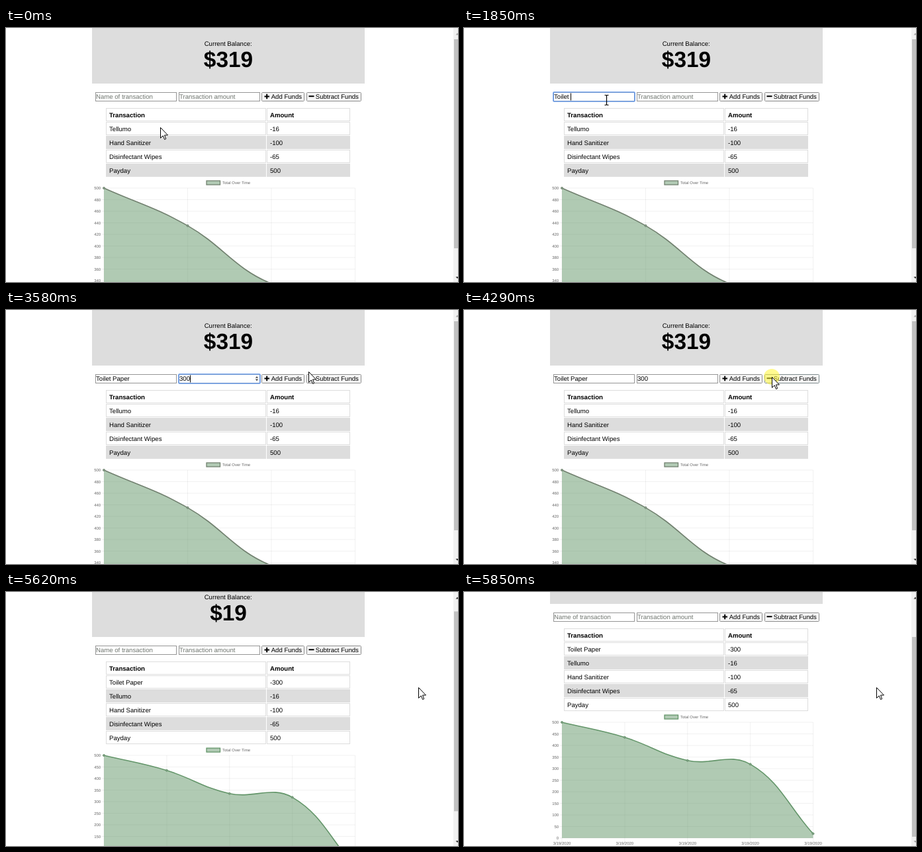
An HTML page that plays this animation: 683x384 px, repeating every 6540 ms.

```html
<!DOCTYPE html>
<html lang="en">
<head>
<meta charset="utf-8">
<title>Budget tracker</title>
<style>
  html, body { margin: 0; width: 100%; height: 100%; overflow: hidden; background: #fff; }
  svg { display: block; width: 683px; height: 384px; }
  text { font: 9.6px "Liberation Sans", Arial, sans-serif; fill: #000; white-space: pre; text-rendering: geometricPrecision; }
  .bold { font-weight: bold; }
  .total { font-size: 33.4px; font-weight: bold; text-anchor: middle; }
  .mid { text-anchor: middle; }
  .hint { fill: #6f756f; }
  .tick { font-size: 6px; fill: #666; }
  .end { text-anchor: end; }
</style>
</head>
<body>
<svg viewBox="0 0 683 384">
  <g id="page"></g>
  <g id="bar"></g>
  <g id="pointer"></g>
</svg>
<script>
const LOOP = 6540;
const el = id => document.getElementById(id);

const rows = [['Tellumo', -16], ['Hand Sanitizer', -100], ['Disinfectant Wipes', -65], ['Payday', 500]];
const nameKeys = [920, 1150, 1300, 1450, 1620, 1700, 1850, 2170, 2320, 2410, 2560, 2650];
const sumKeys = [2870, 3020, 3170];

// Pointer steps: time, x, y, shape
const moves = [
  [0, 233, 150, 'arrow'], [80, 229, 142, 'arrow'], [160, 222, 125, 'arrow'], [230, 217, 112, 'beam'],
  [310, 215, 109, 'beam'], [3430, 290, 105, 'beam'], [3500, 395, 98, 'arrow'], [3580, 457, 93, 'arrow'],
  [3740, 460, 96, 'arrow'], [3820, 463, 99, 'arrow'], [3890, 465, 100, 'arrow'], [4060, 465, 101, 'arrow'],
  [4840, 623, 144, 'arrow']
];
const scrolls = [[0, 0], [5620, 16], [5680, 33], [5770, 52], [5850, 66]];

const latest = (steps, t) => steps.filter(s => s[0] <= t).pop();
const typed = (word, keys, t) => word.slice(0, keys.filter(k => k <= t).length);
const within = (t, a, b) => t >= a && t < b;

const text = (s, x, y, cls = '') => `<text x="${x}" y="${y}" class="${cls}">${s}</text>`;
const rect = (x, y, w, h, attrs) => `<rect x="${x}" y="${y}" width="${w}" height="${h}" ${attrs}/>`;
const path = (d, attrs) => `<path d="${d}" ${attrs}/>`;

const meter = document.createElementNS('http://www.w3.org/2000/svg', 'text');
meter.setAttribute('visibility', 'hidden');
document.querySelector('svg').append(meter);
function widthOf(s) {
  meter.textContent = s;
  return s ? meter.getComputedTextLength() : 0;
}

function input(x, value, hint, focus, caret) {
  let out = rect(x + .5, 97.5, 122, 13, 'fill="#fff" stroke="#959595"');
  if (focus) out += rect(x, 97, 123, 14, 'rx="1" fill="none" stroke="#6396e6" stroke-width="1.6"');
  out += value ? text(value, x + 1, 107) : text(hint, x + 1, 107, 'hint');
  if (caret) out += rect(Math.round(x + 1 + widthOf(value)), 98.5, 1, 11, '');
  return out;
}

function button(x, w, label, labelX, icon, hover) {
  return rect(x + .5, 97.5, w - 1, 13, `rx="1" fill="#f5f5f5" stroke="${hover ? '#7d8a8c' : '#8c8c8c'}"`) +
    path(icon, 'stroke="#000" stroke-width="2"') + text(label, labelX, 107);
}

function table(list) {
  return [['Transaction', 'Amount'], ...list].map(([a, b], i) => {
    const y = 121.5 + 21 * i, cls = i ? '' : 'bold';
    const look = `fill="${i && i % 2 === 0 ? '#ddd' : '#fff'}" stroke="#ddd"`;
    return rect(151.5, y, 241, 19, look) + rect(394.5, y, 125, 19, look) +
      text(a, 156, y + 13.5, cls) + text(b, 399, y + 13.5, cls);
  }).join('');
}

// Cubic spline through the points with tension 0.4
function curve(pts) {
  const dist = (a, b) => Math.hypot(a[0] - b[0], a[1] - b[1]);
  const ctrl = pts.map((p, i) => {
    const a = pts[i - 1] || p, b = pts[i + 1] || p;
    const d0 = dist(a, p), d1 = dist(p, b), k = .4 / (d0 + d1);
    const shift = f => [p[0] + f * (b[0] - a[0]), p[1] + f * (b[1] - a[1])];
    return [shift(-k * d0), shift(k * d1)];
  });
  return 'M' + pts[0] + pts.slice(1).map((p, i) => `C${ctrl[i][1]} ${ctrl[i + 1][0]} ${p}`).join('');
}

function chart(list, top, min, color) {
  const left = 148, right = 527.5, height = 175, bottom = top + height;
  let sum = 0;
  const totals = list.map(r => r[1]).reverse().map(v => sum += v);
  const pts = totals.map((v, i) =>
    [left + (right - left) * i / (totals.length - 1), top + (500 - v) / (500 - min) * height]);
  let grid = '', labels = '';
  for (let i = 0; i <= 10; i++) {
    const y = top + height * i / 10;
    grid += `M144 ${y}H${right}`;
    labels += text(500 - (500 - min) * i / 10, 143.2, y + 2, 'tick end');
  }
  for (const [x] of pts) {
    grid += `M${x} ${top}V${bottom + 5}`;
    labels += text('3/19/2020', x, bottom + 10, 'tick mid');
  }
  const line = curve(pts);
  return path(grid, 'stroke="#000" stroke-opacity=".055"') + labels +
    path(`${line}V${bottom}H${left}Z`, 'fill="#639569" fill-opacity=".5"') +
    path(line, `fill="none" stroke="${color}" stroke-width="1.6"`) +
    pts.map(([x, y]) => `<circle cx="${x}" cy="${y}" r="1.6" fill="#7f9a83" stroke="${color}" stroke-width=".7"/>`).join('') +
    rect(303, top - 11, 20.5, 6, `fill="#b1cab4" stroke="${color}" stroke-width="1.3"`) +
    text('Total Over Time', 327, top - 6, 'tick');
}

function page(t) {
  const paid = t >= 4350;
  const list = paid ? [['Toilet Paper', -300], ...rows] : rows;
  const balance = list.reduce((s, r) => s + r[1], 0);
  const name = paid ? '' : typed('Toilet Paper', nameKeys, t);
  const sum = paid ? '' : typed('300', sumKeys, t);
  const onName = within(t, 620, 2730), onSum = within(t, 2730, 4290);
  let out = rect(130, 0, 412, 84, 'fill="#ddd"') +
    text('Current Balance:', 335.7, 27, 'mid') + text('$' + balance, 336, 59, 'total') +
    input(135, name, 'Name of transaction', onName, onName) +
    input(261, sum, 'Transaction amount', onSum, onSum && t < 3740);
  if (onSum) out += path('M376.8 102.8l2.2-2.6 2.2 2.6zM376.8 104.6l2.2 2.6 2.2-2.6z', 'fill="#444"');
  return out +
    button(386, 65, 'Add Funds', 400.7, 'M390.5 103.5h7.5M394.2 99.8v7.5', false) +
    button(454, 83, 'Subtract Funds', 467.8, 'M457.5 103.2h8', within(t, 3740, 4840)) +
    table(list) +
    (paid ? chart(list, 263, 0, t < 5620 ? '#67896c' : '#639569') : chart(list, 242, 300, '#71806f'));
}

function scrollbar(t, scroll) {
  const size = t < 4350 ? 316 : 302, max = 66;
  const shade = on => `fill="${on ? '#404040' : '#a8a8a8'}"`;
  return rect(676, 0, 7, 384, 'fill="#f1f1f1"') +
    rect(677, 17 + scroll * 51 / max, 6, size, 'fill="#c1c1c1"') +
    path('M679.5 10.5l2.5-3 2.5 3z', shade(scroll > 0)) +
    path('M679.5 376l2.5 3 2.5-3z', shade(scroll < max));
}

function pointer(t) {
  const [, x, y, shape] = latest(moves, t);
  const spot = (cx, cy) => `<circle cx="${cx}" cy="${cy}" r="12" fill="#fff634" fill-opacity=".55"/>`;
  let out = within(t, 620, 700) ? spot(215, 108) : within(t, 4290, 4350) ? spot(465, 101) : '';
  out += shape === 'arrow'
    ? path('M.5.5V16.4L4.2 12.9 6.6 18.5 8.7 17.6 6.5 12H11.5Z', `transform="translate(${x} ${y})" fill="#fff" stroke="#000"`)
    : path('M-3-7.5H-1L0-6.5 1-7.5H3M0-7V7M-3 7.5H-1L0 6.5 1 7.5H3', `transform="translate(${x + .5} ${y})" fill="none" stroke="#000" stroke-width="1.2"`);
  return out;
}

const shown = {};
function put(id, markup) {
  if (shown[id] !== markup) el(id).innerHTML = shown[id] = markup;
}

function draw() {
  const t = performance.now() % LOOP;
  const scroll = latest(scrolls, t)[1];
  put('page', `<g transform="translate(0 ${-scroll})">${page(t)}</g>`);
  put('bar', scrollbar(t, scroll));
  put('pointer', pointer(t));
  requestAnimationFrame(draw);
}
draw();
</script>
</body>
</html>
```
